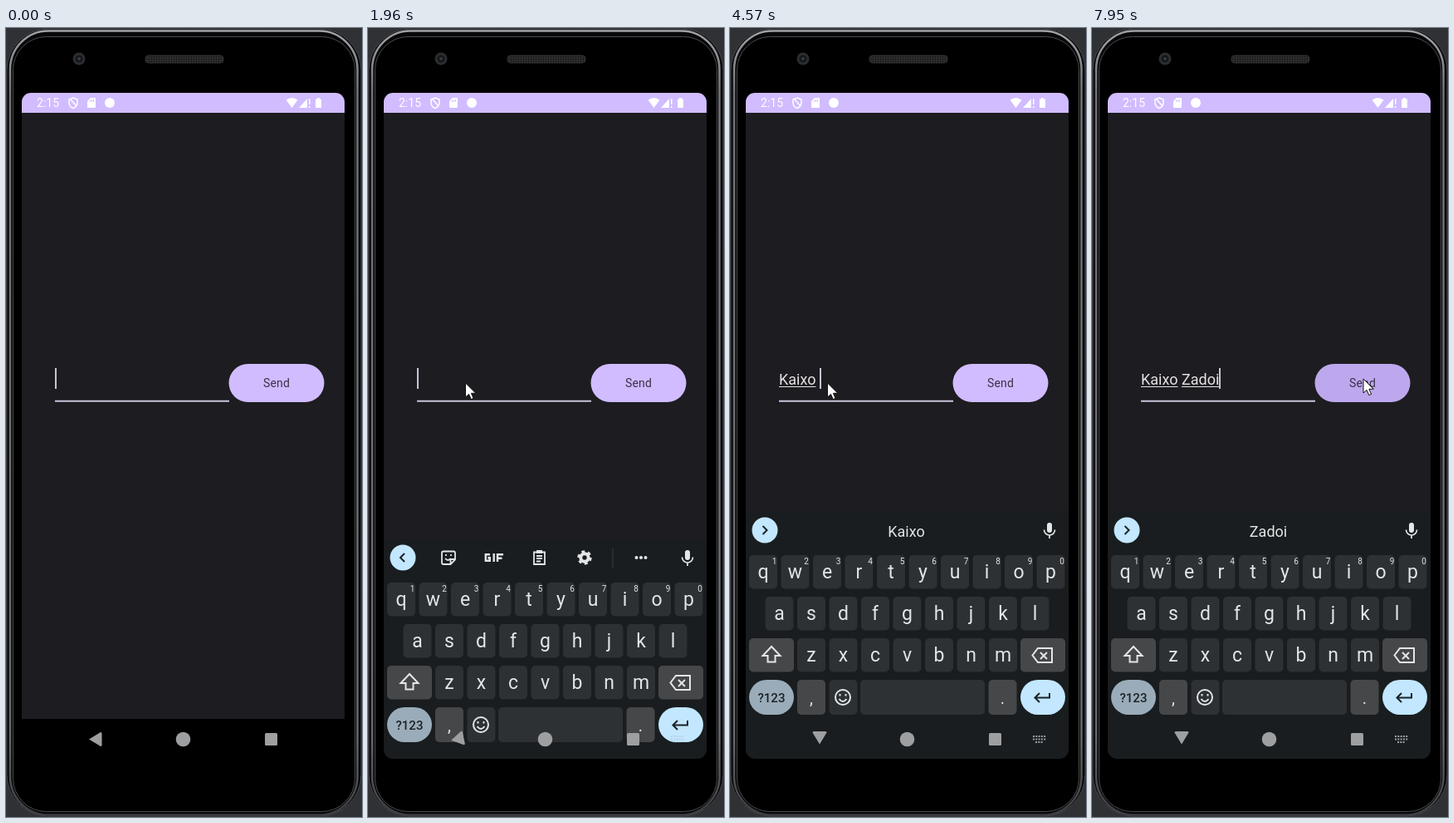
An HTML page for the animation above (8 s loop, 429 px wide and 949 px high).

```html
<!DOCTYPE html>
<html lang="en">
<head>
<meta charset="utf-8">
<title>Phone message</title>
<style>
  html, body { margin: 0; width: 100%; height: 100%; overflow: hidden; background: #303134; }
  svg { position: absolute; left: 0; top: 0; }
  text, #field { font-family: Roboto, sans-serif; }
  #field { position: absolute; left: 59px; top: 413px; font-size: 18px; line-height: 20px; white-space: pre; color: #e6e1e5; }
  #field u { text-decoration-thickness: 1px; text-underline-offset: 2px; text-decoration-skip-ink: none; }
  #field i { position: absolute; top: -4px; width: 2px; height: 25px; margin-left: -.4px; background: #cac4d8; }
  .caps .letter { text-transform: uppercase; }
  .caps #shift { fill: #e3e5e7; }
</style>
</head>
<body>
<svg id="phone" width="429" height="949" viewBox="0 0 429 949">
  <defs>
    <clipPath id="screen"><rect x="19" y="90" width="389" height="789" rx="11"/></clipPath>
    <clipPath id="pill"><rect x="268.5" y="404" width="115" height="46" rx="23"/></clipPath>
    <pattern id="mesh" width="3" height="3" patternUnits="userSpaceOnUse">
      <rect width="3" height="3" fill="#303030"/><circle cx="1.5" cy="1.5" r=".9" fill="#111"/>
    </pattern>
    <linearGradient id="rim" x2="0" y2="1">
      <stop stop-color="#a0a1a5"/><stop offset=".08" stop-color="#737478"/>
      <stop offset=".9" stop-color="#68696d"/><stop offset="1" stop-color="#3c3d40"/>
    </linearGradient>
  </defs>

  <!-- body -->
  <rect width="429" height="949" fill="#303134"/>
  <g fill="none">
    <rect x="1" y="1" width="427" height="947" rx="50" fill="#08080a" stroke="#48494d"/>
    <rect x="5" y="3.5" width="418.5" height="943" rx="46" stroke="url(#rim)" stroke-width="2.5"/>
    <rect x="8.5" y="10.5" width="412" height="932" rx="40" fill="#000" stroke="#4a4b4e"/>
  </g>
  <rect x="168" y="33" width="94" height="9" rx="4" fill="url(#mesh)" stroke="#333"/>
  <circle cx="88" cy="37" r="7.5" fill="#2b2d30"/><circle cx="88" cy="37" r="4.5" fill="#15171a"/>
  <circle cx="88" cy="37" r="1.8" fill="#3b4048"/>

  <!-- screen and status bar -->
  <path d="M19 102H408V831H19z" fill="#1d1c20"/>
  <path d="M19 102V89a11 11 0 0 1 11-11H397a11 11 0 0 1 11 11V102z" fill="#d0bcff"/>
  <g fill="#fff">
    <text x="37" y="95" font-size="14">2:15</text>
    <path d="M81 84l5 2v4q0 4.500-5 6.500q-5-2-5-6.500v-4zM78 86l7 8" fill="none" stroke="#fff" stroke-width="1.500"/>
    <path d="M102 84h5q1 0 1 1v10q0 1-1 1h-8q-1 0-1-1v-7z"/>
    <path d="M101.500 86.500v2.500M103.500 86v3M105.500 86v3" stroke="#d0bcff"/>
    <circle cx="125" cy="90" r="6"/>
    <path d="M337.500 86.500q7-5 14 0l-7 9.500zM353 96l10-11v11zM365 85h1.500v7H365zM365 94h1.500v2H365z"/>
    <path d="M373 85.500h2V84h3v1.500h2V96h-7z"/>
  </g>

  <!-- form -->
  <path d="M59 448.700H269" stroke="#cac4dc" stroke-width="2"/>
  <g clip-path="url(#pill)">
    <rect id="button" x="268" y="404" width="116" height="46"/>
    <circle id="ripple" cx="326" cy="427" fill="#381e72" opacity=".05"/>
  </g>
  <text x="326" y="432" font-size="14" letter-spacing=".2" text-anchor="middle" fill="#3a3047">Send</text>

  <!-- keyboard -->
  <g clip-path="url(#screen)">
    <g id="keyboard" fill="#e3e5e7">
      <path d="M19 581H408V900H19z" fill="#191d1f"/>
      <g id="keys"></g>
      <g fill="none" stroke="#e3e5e7" stroke-width="2">
        <path id="shift" d="M50 744l-10.500 11h6v7.500h9v-7.500h6z"/>
        <path d="M371 746h17v17h-17l-6.500-8.500zM374 751l8 8M382 751l-8 8"/>
        <circle cx="136" cy="805" r="9"/>
        <path d="M131.500 807q4.500 6 9 0M132.500 801v2.500M139.500 801v2.500"/>
        <path d="M385 800v5.500h-17M373 800l-5.500 5.500l5.500 5.500" stroke="#1b2226"/>
      </g>
      <circle cx="42" cy="604" r="15.500" fill="#c2e7ff"/>
      <path id="chevron" fill="none" stroke="#1b2226" stroke-width="2"/>
      <rect x="382" y="595" width="6" height="12" rx="3"/>
      <path d="M378.500 603.500a6.500 6.500 0 0 0 13 0M385 610v4" fill="none" stroke="#e3e5e7" stroke-width="1.700"/>
      <g id="tools">
        <g fill="none" stroke="#e3e5e7" stroke-width="1.800">
          <path d="M91 596.500h12q2 0 2 2v8l-5.500 5.500h-8.500q-2 0-2-2v-11.500q0-2 2-2zM105 606h-5.500v6M93 605q3.500 4 6.500 0M94 600v2M100 600v2"/>
          <path d="M147 600.200h-5.200v7.600h5v-3.600h-2.500M151.700 599v10M156 609v-8.800h7M156 604.800h5.500" stroke-width="2.400"/>
          <path d="M200 597.500h13v14.500h-13zM203 602h7M203 605h7M203 608.500h5"/>
          <path d="M203 597h7" stroke-width="4"/>
          <circle cx="261" cy="604" r="4.700" stroke-width="4"/>
          <circle cx="261" cy="604" r="7.400" stroke-width="2.600" stroke-dasharray="3.900 3.850"/>
        </g>
        <path d="M295 593v23" stroke="#3a3f42"/>
        <circle cx="323.500" cy="604" r="2"/><circle cx="329" cy="604" r="2"/><circle cx="334.500" cy="604" r="2"/>
      </g>
      <g id="words" font-size="18" text-anchor="middle"></g>
    </g>
  </g>

  <!-- navigation -->
  <g fill="#9d9fa1">
    <path id="back" d="M100 855.500l14-8.500q1.500 0 1.500 1.500v14q0 1.500-1.500 1.500z"/>
    <circle cx="213.500" cy="855.500" r="8.800"/>
    <rect x="312" y="848" width="15" height="15" rx="1.500"/>
    <path id="ime" d="M365 852h16M365 855.500h16M368 859h9" stroke="#9d9fa1" stroke-width="1.800" stroke-dasharray="2 1.300"/>
  </g>
</svg>
<div id="field"></div>
<svg width="429" height="949">
  <path id="mouse" d="M0 0V17L4 13.400L6.800 19.600L9.600 18.400L6.900 12.300H12.300z" fill="#fff" stroke="#111"/>
</svg>
<script>
const el = id => document.getElementById(id);
const PITCH = 38.5, KEY = '#2d3134', MODIFIER = '#464749';

// Keyboard layout
const key = (x, y, w, fill = KEY, h = 40.5, r = 5) =>
  `<rect x="${x}" y="${y}" width="${w}" height="${h}" rx="${r}" fill="${fill}"/>`;
const label = (x, y, s, size = 23, extra = '') =>
  `<text x="${x}" y="${y}" font-size="${size}" text-anchor="middle" ${extra}>${s}</text>`;

let keys = '';
[['qwertyuiop', 23, 634], ['asdfghjkl', 42.5, 684], ['zxcvbnm', 81, 734]].forEach(([row, left, y], r) =>
  [...row].forEach((c, i) => {
    const x = left + i * PITCH;
    keys += key(x, y, 34) + label(x + 17, y + 27.5, c, 23, 'class="letter"');
    if (!r) keys += label(x + 30.5, y + 11, (i + 1) % 10, 10);
  }));
keys += key(23, 734, 54, MODIFIER) + key(350, 734, 54, MODIFIER)
  + key(23, 784, 54, '#9aacb9', 42, 21) + label(50, 811, '?123', 15, 'fill="#1b2226" font-weight="500"')
  + key(81, 784, 34, MODIFIER, 42) + label(98, 813, ',', 20)
  + key(119.5, 784, 34, KEY, 42) + key(157, 784, 150, KEY, 42)
  + key(311.5, 784, 34, MODIFIER, 42) + label(328.5, 813, '.', 20)
  + key(350, 784, 54, '#c2e7ff', 42, 21);
el('keys').innerHTML = keys;

// Timed states: [start, value]
const TEXT = [
  [0, ''], [2900, '<u>K</u>'], [3370, '<u>K</u>a'], [3570, '<u>Ka</u>i'], [3770, '<u>Kai</u>'],
  [4170, '<u>Kai</u>x'], [4300, '<u>Kaix</u>o'], [4360, '<u>Kaixo</u>'], [4500, '<u>Kaixo</u> '],
  [4760, '<u>Kaixo</u> <u>Z</u>'], [5030, '<u>Kaixo</u> <u>Z</u>a'], [5230, '<u>Kaixo</u> <u>Za</u>'],
  [5690, '<u>Kaixo</u> <u>Za</u>d'], [5960, '<u>Kaixo</u> <u>Zad</u>o'], [6020, '<u>Kaixo</u> <u>Zado</u>'],
  [6220, '<u>Kaixo</u> <u>Zado</u>i'], [6420, '<u>Kaixo</u> <u>Zadoi</u>']
];
const WORDS = [
  [0, []], [2900, ['K', 'I', 'Know']], [3570, ['Ka', 'La', 'Kale']], [3770, ['Kai', 'Lai', 'Kaki']],
  [4230, ['Kaix', 'Fix', 'Kayak']], [4360, ['Kaix', 'Kaixo', '']], [4570, ['Kaixo']],
  [4830, ['Z', 'Zoo', 'Zero']], [5230, ['Za', 'Zap', 'Zany']], [6020, ['Zad', 'Sad', 'Had']],
  [6220, ['Zado', 'Shadow', 'Dado']], [6420, ['Zadoi']]
];
const CARET = [[0, 1], [440, 0], [900, 1], [1430, 0], [1890, 1], [2430, 0], [2900, 1], [6950, 0], [7420, 1]];
const SLIDE = [[0, 298], [1890, 226], [1960, 33], [2020, 10], [2090, 3], [2160, 0]];
const TURN = [[0, 0], [1960, .13], [2020, .5], [2090, .85], [2160, 1]];
// Pointer moves: start, end, from, to
const MOVES = [
  [440, 900, 346, 932, 145, 513],
  [1170, 1690, 121, 443, 117.5, 427],
  [6950, 7650, 217, 422, 327, 422]
];

const at = (states, t) => states.findLast(s => s[0] <= t)[1];

function pointer(t) {
  const [start, end, x0, y0, x1, y1] = MOVES.findLast(m => m[0] <= t);
  const p = Math.min(1, Math.floor((t - start) / 66) * 66 / (end - start - 66));
  const e = 1 - (1 - p) ** 2;
  return [x0 + (x1 - x0) * e, y0 + (y1 - y0) * e];
}

const suggestions = words => words.length < 2
  ? words.map(w => label(212.5, 612, w, 18)).join('')
  : words.map((w, i) => label(110 + 102 * i, 612, w, 18)).join('')
    + '<path d="M158.500 592v24M266.500 592v24" stroke="#3a3f42"/>';

const shown = {};
function setHTML(id, html) {
  if (shown[id] !== html) el(id).innerHTML = shown[id] = html;
}

function draw() {
  const t = performance.now() % 8000;
  setHTML('field', at(TEXT, t) + (at(CARET, t) ? '<i></i>' : ''));
  setHTML('words', suggestions(at(WORDS, t)));

  const typing = t >= 2900, turn = at(TURN, t);
  el('keyboard').setAttribute('transform', `translate(0 ${at(SLIDE, t)})`);
  el('keyboard').setAttribute('visibility', t < 1890 ? 'hidden' : 'visible');
  el('tools').setAttribute('display', typing ? 'none' : 'inline');
  el('chevron').setAttribute('d', typing ? 'M39.500 599l5 5l-5 5' : 'M44 599l-5 5l5 5');
  el('phone').classList.toggle('caps', t >= 4760 && t < 4830);
  el('back').setAttribute('transform', `translate(0 ${-2 * turn}) rotate(${-90 * turn} 108 855.5)`);
  el('ime').setAttribute('opacity', turn && Math.min(1, turn + .15));

  const moving = t >= 440;
  const [x, y] = moving ? pointer(t) : [0, 0];
  el('mouse').setAttribute('visibility', moving ? 'visible' : 'hidden');
  el('mouse').setAttribute('transform', `translate(${x} ${y})`);
  el('button').setAttribute('fill', t > 6950 && x > 269 ? '#c4b0f4' : '#d0bcff');
  el('ripple').setAttribute('r', t < 7810 ? 0 : 20 + (t - 7810) * .3);
  requestAnimationFrame(draw);
}
draw();
</script>
</body>
</html>
```
